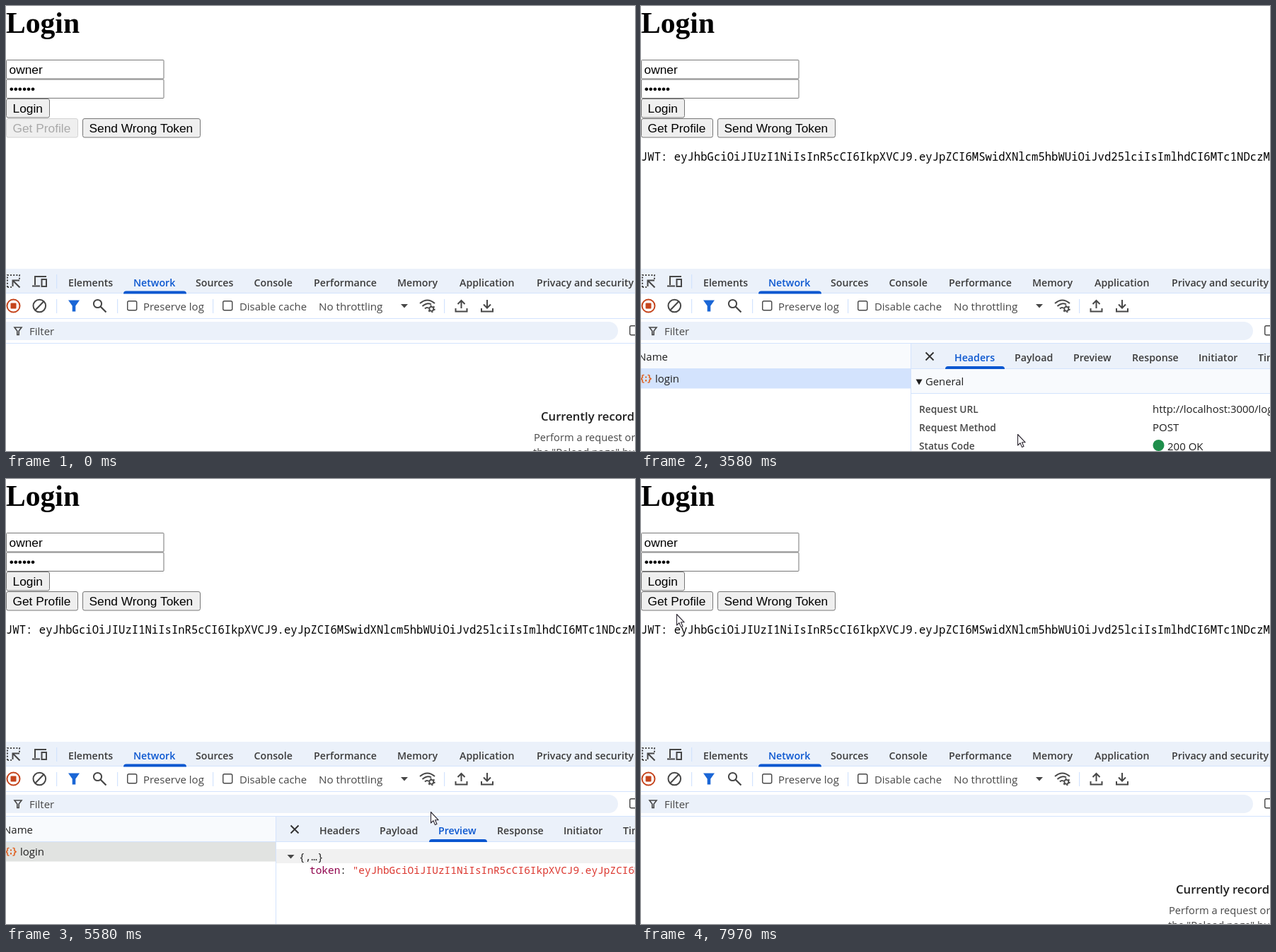
These frames come from a looping animation (889x630 px, 8000 ms). An HTML page:

```html
<!DOCTYPE html>
<html lang="en">
<head>
<meta charset="utf-8">
<title>Login</title>
<style>
html, body { margin: 0; width: 100%; height: 100%; overflow: hidden; background: #fff; }
svg { display: block; width: 889px; height: 630px; }
text { white-space: pre; }
.ui { font-family: "Open Sans", "Noto Sans", sans-serif; font-size: 15px; }
.form { font-family: "Liberation Sans", Arial, sans-serif; font-size: 17.33px; }
.mono { font-family: "Noto Sans Mono", "DejaVu Sans Mono", monospace; }
</style>
</head>
<body>
<svg id="stage" viewBox="0 0 889 630" xmlns="http://www.w3.org/2000/svg"></svg>
<script>
const LOOP = 8000;
const BLUE = '#0b57d0', LINE = '#d3e3fd', BAR = '#ebf1fa', PALE = '#f8fafd';
const INK = '#1f1f1f', GREY = '#474747', TAB = '#3c3c3c', KEY = '#8e004b', RED = '#dc362e';
const TOKEN = 'eyJhbGciOiJIUzI1NiIsInR5cCI6IkpXVCJ9.' +
  'eyJpZCI6MSwidXNlcm5hbWUiOiJvd25lciIsImlhdCI6MTc1NDczM';

const rect = (x, y, w, h, fill, more = '') =>
  `<rect x="${x}" y="${y}" width="${w}" height="${h}" fill="${fill}" ${more}/>`;
const text = (x, y, s, cls, fill, more = '') =>
  `<text x="${x}" y="${y}" class="${cls}" fill="${fill}" ${more}>${s}</text>`;
const ui = (x, y, s, fill = INK, size = 15, weight = 400, more = '') =>
  text(x, y, s, 'ui', fill, `style="font-size:${size}px;font-weight:${weight}" ${more}`);
const mono = (x, y, s, fill = INK, size = 14.45) =>
  text(x, y, s, 'mono', fill, `font-size="${size}"`);
const path = (d, stroke, w = 2, fill = 'none') =>
  `<path d="${d}" stroke="${stroke}" stroke-width="${w}" fill="${fill}"/>`;
const solid = (d, fill) => `<path d="${d}" fill="${fill}"/>`;
const group = (id, body) => `<g id="${id}">${body}</g>`;
const box = (x, y) => rect(x + .75, y + .75, 13, 13, '#fff', `rx="2" stroke="${GREY}" stroke-width="1.4"`);
const down = (x, y) => solid(`M${x} ${y}h10l-5 5.5z`, GREY);
const underline = (x, y, w) => solid(`M${x} ${y + 4}q0 -4 4 -4h${w - 8}q4 0 4 4z`, BLUE);

const buttons = [
  { id: 'bLogin', x: 0, y: 131, w: 62, label: 'Login' },
  { id: 'bProfile', x: 0, y: 159, w: 102, label: 'Get Profile' },
  { id: 'bWrong', x: 108, y: 159, w: 167, label: 'Send Wrong Token' }
];
const tabs = [
  { id: 'Headers', x: 443, l: 430, w: 84 },
  { id: 'Payload', x: 528, l: 515, w: 82 },
  { id: 'Preview', x: 611, l: 598, w: 82 },
  { id: 'Response', x: 694, l: 681, w: 93 },
  { id: 'Initiator', x: 788, l: 775, w: 83 },
  { id: 'Timing', x: 872, l: 859, w: 76 }
];

function form() {
  const input = y => rect(.5, y + .5, 222.5, 26.5, '#fff', 'stroke="#767676" rx="1"');
  return text(0, 38, 'Login', '', '#000',
      'style="font:bold 41.6px \'Liberation Serif\',\'Times New Roman\',serif"') +
    input(76) + input(103.5) +
    text(4.5, 96, 'owner', 'form', '#000') + text(4.7, 123, '••••••', 'form', '#000') +
    buttons.map(b =>
      rect(b.x + .5, b.y + .5, b.w - 1, 26.5, '#efefef', `id="${b.id}" rx="2.5" stroke="#767676"`) +
      text(b.x + 9.5, b.y + 20, b.label, 'form', '#000', `id="${b.id}T"`)).join('') +
    group('jwt', mono(0, 219, 'JWT: ' + TOKEN, '#000', 15.6));
}

function toolbar() {
  const heads = [[88, 'Elements'], [180, 'Network'], [268, 'Sources'], [350.5, 'Console'],
    [435, 'Performance'], [553, 'Memory'], [641, 'Application'], [750, 'Privacy and security']];
  const arrow = (x, d) => path(`M${x} ${d}`, GREY) + path(`M${x - 8} 428v4.5h16v-4.5`, GREY);
  return rect(0, 372, 889, 35, BAR) + rect(0, 406, 889, 1, LINE) +
    heads.map(([x, s]) => ui(x, 397, s, s === 'Network' ? BLUE : TAB, 14.2, 600)).join('') +
    underline(166, 403.5, 89) +
    // inspect and device icons
    `<path d="M2 398V381H19V388M2 398H8" fill="none" stroke="${GREY}" stroke-width="2" stroke-dasharray="2 2.2"/>` +
    path('M19.5 398.5L10 389M9.5 397V388.5H19', GREY) +
    path('M41 395V383H57M37 396.5H48', GREY) + path('M50.5 387h6.5v10h-6.5z', GREY) +
    [71, 157, 292, 619].map(x => rect(x, 415, 1.2, 20, LINE)).join('') + rect(71, 380, 1.2, 20, LINE) +
    `<circle cx="10.5" cy="424.5" r="9" fill="none" stroke="#c5441c" stroke-width="2"/>` +
    rect(6.5, 420.5, 8, 8, '#c5441c', 'rx="1"') +
    `<circle cx="47.3" cy="424.5" r="8.8" fill="none" stroke="${GREY}" stroke-width="2"/>` +
    path('M41 431L53.5 418', GREY) +
    solid('M88 416.5H104L98.3 424.5V432.5H93.7V424.5z', '#1a66d6') +
    `<circle cx="129.5" cy="421.5" r="5.6" fill="none" stroke="${GREY}" stroke-width="2"/>` +
    path('M133.5 425.5L141.5 433.5', GREY, 2.3) +
    box(171, 417) + ui(194, 431, 'Preserve log', GREY) +
    box(306, 417) + ui(330, 431, 'Disable cache', GREY, 14.9) +
    ui(442, 431, 'No throttling', GREY, 15.2) + down(558, 422) +
    // wireless icon with a small gear
    path('M585 421Q595.5 412 606 421M588.5 425Q595.5 419 601 422.5M592 428.5Q594 426.5 596 427', GREY) +
    `<circle cx="601.3" cy="428.8" r="3" fill="none" stroke="${GREY}" stroke-width="1.8"/>` +
    `<circle cx="601.3" cy="428.8" r="4.6" fill="none" stroke="${GREY}" stroke-width="1.6" stroke-dasharray="2.2 2.6"/>` +
    arrow(643.5, '428V417M638.5 422l5 -5 5 5') +
    arrow(680, '416V427M675 422.5l5 5 5 -5') +
    rect(0, 442, 889, 1, LINE) +
    rect(-14, 447, 879, 26, BAR, 'rx="13"') +
    path('M12 455H22L18.2 460V465.5H15.8V460z', GREY, 1.6) +
    ui(33, 466, 'Filter', GREY) + box(881, 452) + rect(0, 477, 889, 1, LINE);
}

const recording = () => ui(756, 587, 'Currently recording network activity', INK, 16.7, 600) +
  ui(746, 615.5, 'Perform a request or reload the page by using', GREY, 14.7) +
  ui(745, 637, 'the "Reload page" button or by pressing', GREY, 14.7);

function list() {
  const c = '#e0662a';
  return rect(0, 478, 889, 35, PALE, 'id="head"') + rect(0, 513, 889, 1, LINE) +
    rect(0, 514, 889, 27.5, '#f6f9fd', 'id="row"') +
    path('M4.5 522.5H3.2Q2 522.5 2 524V526L0 527.8 2 529.5V531.5Q2 533 3.2 533H4.5M9.5 522.5H10.8Q12 522.5 12 524V526L14 527.8 12 529.5V531.5Q12 533 10.8 533H9.5', c, 1.7) +
    rect(6, 524.5, 2, 2, c) + rect(6, 529, 2, 2.5, c) +
    ui(-4, 502, 'Name') + ui(20, 533, 'login') +
    group('wide', rect(716, 478, 173, 35, PALE) + ui(723, 502, 'Status') + ui(723, 533, '200') +
      rect(716, 478, 1, 152, LINE));
}

function details() {
  const head = (y, s) => ui(393, y, s, GREY, 13.7, 600);
  const pair = (x, y, k, v) => mono(x, y, `<tspan fill="${KEY}">${k}</tspan>: <tspan fill="${RED}">"${v}"</tspan>`);
  return rect(381, 478, 508, 152, '#fff') + rect(381, 478, 508, 36, BAR) + rect(381, 513, 508, 1, LINE) +
    path('M402.5 490.5L413.5 501.5M413.5 490.5L402.5 501.5', '#303030', 1.8) +
    tabs.map(t => rect(t.l, 478, t.w, 35, '#dfe4ec', `id="h${t.id}"`) +
      ui(t.x, 503, t.id, TAB, 14.2, 600, `id="t${t.id}"`) +
      group('u' + t.id, underline(t.l, 510, t.w))).join('') +
    group('pHeaders', rect(382, 514, 507, 34, PALE) + rect(382, 548, 507, 1, LINE) +
      solid('M388.5 528.5h9l-4.5 8z', INK) + ui(402, 537, 'General', INK, 14.8, 500) +
      head(576, 'Request URL') + head(601.5, 'Request Method') + head(628, 'Status Code') +
      ui(723, 576, 'http://localhost:3000/login', INK, 14.9) + ui(723, 602, 'POST') +
      '<circle cx="731.5" cy="622" r="8" fill="#1f8f4c"/>' + ui(744, 628.5, '200 OK')) +
    group('pPayload', down(397, 536) + ui(410, 543, 'Request Payload', INK, 14.9, 700) +
      rect(571.5, 521.5, 118, 31, '#fff', 'rx="15.5" stroke="#a8c7fa"') +
      ui(587.5, 544, 'View source', BLUE, 14.5, 600) + down(410, 569.5) +
      mono(426, 577, '{username: "owner", password: "123456"}') +
      pair(428, 601, 'password', '123456') + pair(428, 623, 'username', 'owner')) +
    group('pPreview', rect(382, 524, 507, 20, '#f1f1f1', 'id="rowHover"') + down(397.5, 532) +
      mono(414, 540, '{,…}') + pair(429, 559, 'token', TOKEN)) +
    rect(381, 478, 1, 152, LINE);
}

const stage = document.getElementById('stage');
stage.innerHTML = form() + toolbar() + group('rec', recording()) + group('list', list()) +
  group('det', details()) +
  group('cursor', '<path d="M.5 .5V16L4 12.7 6.5 18.6 9 17.5 6.5 11.8H11.2z" fill="#fff" stroke="#2b2630" stroke-width="1.1" stroke-linejoin="round"/>');

const el = {};
stage.querySelectorAll('[id]').forEach(n => el[n.id] = n);
const show = (id, on) => el[id].setAttribute('display', on ? 'inline' : 'none');
const fill = (id, c) => el[id].setAttribute('fill', c);

// pointer path: time, x, y
const keys = [
  [320, 800, 518], [1060, 50, 137], [1130, 54, 137], [1330, 45, 137], [2140, 46, 137],
  [2480, 33, 517], [2550, 42, 534], [3370, 44, 532], [3580, 532, 606], [3780, 537, 603],
  [4170, 565, 515], [4240, 562, 498], [4450, 564, 497], [4710, 627, 494], [5180, 632, 497],
  [5380, 622, 546], [5580, 600, 471], [5970, 149, 201], [6040, 143, 200], [6300, 60, 190],
  [6600, 28, 330], [6830, 32, 445], [6900, 42, 440], [7170, 41, 438], [7300, 46, 425],
  [7500, 48, 424], [7830, 54, 231], [7970, 50, 191]
];
// still spans, where the pointer keeps the place it had at the start
const rests = [[1330, 2070], [2550, 3300], [4710, 5110], [7300, 7440]];

function pointer(t) {
  let i = 0;
  while (i < keys.length - 2 && keys[i + 1][0] <= t) i++;
  const a = keys[i], b = keys[i + 1];
  let from = a[0];
  for (const [s, e] of rests) if (s >= a[0] && s < b[0]) from = e;
  const p = Math.min(1, Math.max(0, (t - from) / (b[0] - from)));
  const k = p * p * (3 - 2 * p);
  return [a[1] + (b[1] - a[1]) * k, a[2] + (b[2] - a[2]) * k];
}

function draw(t) {
  const [x, y] = pointer(t);
  const seen = t >= 320;
  const over = (l, top, w, h) => seen && x >= l && x < l + w && y >= top && y < top + h;
  const logged = t >= 1600, listed = logged && t < 7370, open = listed && t >= 2750;
  const tab = t < 4380 ? 'Headers' : t < 4850 ? 'Payload' : 'Preview';

  show('cursor', seen);
  el.cursor.setAttribute('transform', `translate(${x.toFixed(1)} ${y.toFixed(1)})`);

  for (const b of buttons) {
    const off = b.id === 'bProfile' && !logged;
    const press = b.id === 'bLogin' && t >= 1530 && t < 1600;
    fill(b.id, press ? '#f5f5f5' : !off && over(b.x, b.y, b.w, 27) ? '#e5e5e5' : '#efefef');
    el[b.id].setAttribute('stroke', off ? '#d2d2d2' : '#767676');
    fill(b.id + 'T', off ? '#a9a9a9' : '#000');
  }
  show('jwt', logged);
  show('rec', !listed);
  show('list', listed);
  show('wide', listed && !open);
  show('det', open);
  const onHead = !open && t >= 2400 && over(0, 478, 716, 40);
  fill('head', onHead ? '#ebeced' : PALE);
  fill('row', open ? (t < 4380 ? LINE : '#e1e3e1') : !onHead && over(0, 514, 889, 27) ? '#edf1f7' : '#f6f9fd');

  for (const s of tabs) {
    const hover = over(s.l, 478, s.w, 35);
    show('h' + s.id, hover);
    show('u' + s.id, s.id === tab);
    fill('t' + s.id, s.id === tab ? BLUE : hover ? INK : TAB);
  }
  for (const id of ['Headers', 'Payload', 'Preview']) show('p' + id, id === tab);
  show('rowHover', t >= 5290 && t < 5640);
}

const start = performance.now();
function tick() {
  draw((performance.now() - start) % LOOP);
  requestAnimationFrame(tick);
}
tick();
</script>
</body>
</html>
```
